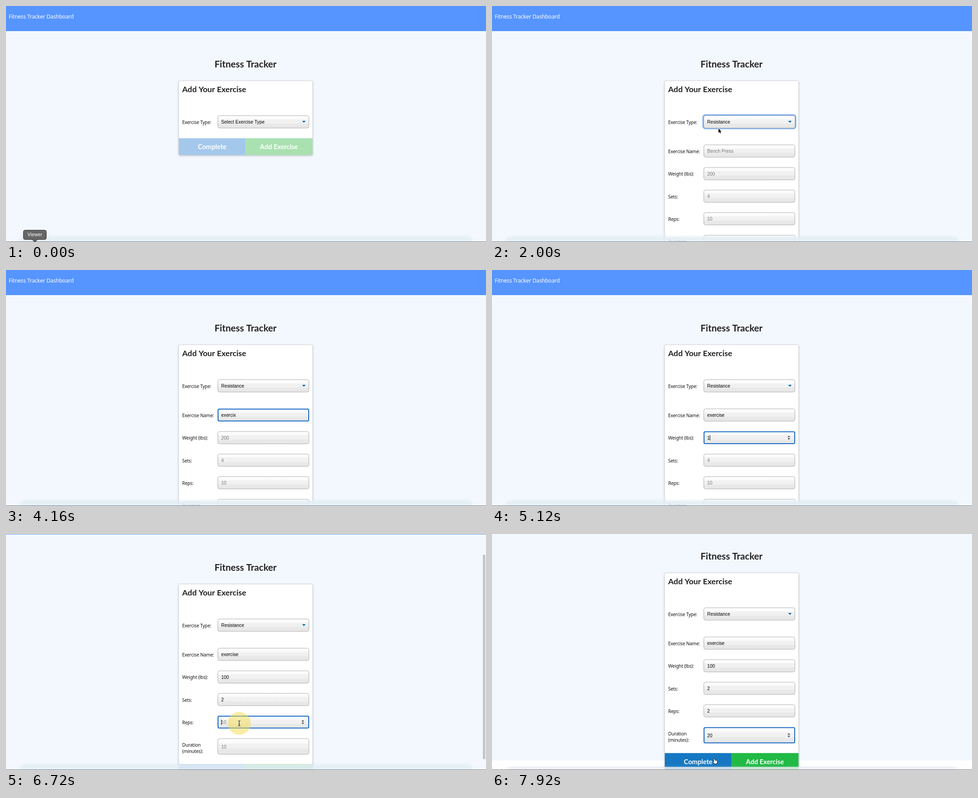
An HTML page with a canvas that plays this animation: 1064x526 px, repeating every 8 s.

```html
<!DOCTYPE html>
<html lang="en">
<head>
<meta charset="utf-8">
<title>Exercise form</title>
<style>
  html, body { margin: 0; height: 100%; overflow: hidden; background: #f3f8ff; }
  canvas { display: block; }
</style>
</head>
<body>
<canvas id="stage" width="1064" height="526"></canvas>
<script>
const ctx = document.getElementById('stage').getContext('2d');
const LOOP = 8000, STEP = 80;
const LABEL = '10.2px "Noto Sans", "Open Sans", sans-serif';
const INPUT = '10.3px "Liberation Sans", Arial, sans-serif';
const lato = size => `bold ${size}px Lato, sans-serif`;
const inter = (size, weight) => `${weight} ${size}px Inter, sans-serif`;

// Typed text: [time, value]; a field is focused from its own time to the next field's.
const fields = [
  { label: ['Exercise Name:'], y: 309.5, h: 27.5, hint: 'Bench Press', focus: 2400,
    typed: [[2800, 'e'], [2960, 'ex'], [3120, 'exe'], [3200, 'exer'], [3520, 'exerc'], [3680, 'exercix'],
            [3920, 'exercixs'], [4160, 'exercix'], [4240, 'exerci'], [4400, 'exercis'], [4480, 'exercise']] },
  { label: ['Weight (lbs):'], y: 360, h: 27.5, hint: '200', focus: 4880, number: true,
    typed: [[5120, '1'], [5440, '10'], [5520, '100']] },
  { label: ['Sets:'], y: 410.2, h: 27.5, hint: '4', focus: 5920, number: true, typed: [[6080, '2']] },
  { label: ['Reps:'], y: 460.5, h: 27.5, hint: '10', focus: 6640, number: true, typed: [[6960, '2']] },
  { label: ['Duration', '(minutes):'], y: 511, h: 35, hint: '10', focus: 7440, number: true,
    typed: [[7600, '2'], [7840, '20']] },
];
const suggestions = ['Lidi Tarvek', 'AttA', 'sasdD', 'ddadsadd', 'wefwf', 'LidiT'];

const pointerPath = [
  [80, 64, 530], [640, 514, 258], [1560, 514, 258], [1720, 502, 273], [2000, 502, 273], [2320, 499, 325],
  [4560, 499, 325], [4800, 505, 383], [5600, 505, 383], [5840, 510, 431], [6480, 510, 431], [6640, 517, 422],
  [7120, 517, 422], [7360, 515, 450], [7680, 515, 450], [7920, 491, 506],
];
const pointerShown = [[160, 2800], [4560, 5120], [5680, 6080], [6240, 6960], [7040, 7600], [7840, LOOP]];
const clicks = [[1120, 1560], [1720, 1840], [2400, 2560], [4800, 4960], [5840, 5920], [6560, 6640], [7360, 7440]];

const within = (t, a, b) => t >= a && t < b;

function ease(t, a, b) {
  const p = Math.min(1, Math.max(0, (t - a) / (b - a)));
  return p * p * (3 - 2 * p);
}

function text(str, x, y, font, color, align = 'left', spacing = '0px') {
  ctx.font = font;
  ctx.fillStyle = color;
  ctx.textAlign = align;
  ctx.letterSpacing = spacing;
  ctx.fillText(str, x, y);
}

function box(x, y, w, h, r, fill, stroke, width = 1) {
  ctx.beginPath();
  ctx.roundRect(x, y, w, h, r);
  if (fill) { ctx.fillStyle = fill; ctx.fill(); }
  if (stroke) { ctx.strokeStyle = stroke; ctx.lineWidth = width; ctx.stroke(); }
}

function polygon(points, fill, stroke) {
  ctx.beginPath();
  points.forEach(([x, y]) => ctx.lineTo(x, y));
  ctx.closePath();
  if (stroke) { ctx.strokeStyle = stroke; ctx.lineWidth = 1.4; ctx.stroke(); }
  ctx.fillStyle = fill;
  ctx.fill();
}

function withShadow(color, blur, offset, draw) {
  ctx.save();
  ctx.shadowColor = color;
  ctx.shadowBlur = blur;
  ctx.shadowOffsetY = offset;
  draw();
  ctx.restore();
}

function control(y, h, focused) {
  const g = ctx.createLinearGradient(0, y, 0, y + h);
  [[0, '#fff'], [0.3, '#f9f9f9'], [0.3, '#f2f2f2'], [0.64, '#f0f0f0'], [0.64, '#eaeaea'], [1, '#e6e6e6']]
    .forEach(([at, color]) => g.addColorStop(at, color));
  if (focused) box(470, y + 0.5, 201, h - 1, 2.5, g, '#1567c4', 2);
  else box(469.5, y, 202, h, 4, g, '#adadad');
}

function label(lines, y) {
  lines.forEach((line, i) => text(line, 390.5, y + i * 14.2, LABEL, '#111', 'left', '-0.16px'));
}

function drawField(t, field, i) {
  const end = i + 1 < fields.length ? fields[i + 1].focus : LOOP;
  const focused = within(t, field.focus, end);
  const entry = field.typed.filter(([at]) => at <= t).pop();
  const value = entry ? entry[1] : '';
  const mid = field.y + field.h / 2;
  label(field.label, field.label.length > 1 ? 529 : mid + 4.6);
  control(field.y, field.h, focused);
  text(value || field.hint, 477, mid + 4, INPUT, value ? '#000' : '#767676');
  if (!focused) return;
  if (!within(t, 4160, 4400) && t < 7840) {
    const caret = 477 + (value ? ctx.measureText(value).width : 0);
    ctx.fillStyle = '#000';
    ctx.fillRect(caret, mid - 5.5, 1, 11.5);
  }
  if (field.number) {
    polygon([[655, mid - 1.3], [658, mid - 4.5], [661, mid - 1.3]], '#444');
    polygon([[655, mid + 1.3], [658, mid + 4.5], [661, mid + 1.3]], '#444');
  }
}

function drawButtons(t, y) {
  const active = t >= 7840;
  const complete = active ? (t >= 7920 ? '#1678c2' : '#2185d0') : '#a4c8ec';
  box(383, y, 148.5, 37.5, [0, 0, 0, 3], complete);
  box(531.5, y, 148, 37.5, [0, 0, 3, 0], active ? '#21ba45' : '#a9e1b0');
  text('Complete', 457, y + 24.7, lato(14.7), '#fff', 'center');
  text('Add Exercise', 605, y + 24.7, lato(14.7), '#fff', 'center');
}

function drawMenu() {
  withShadow('rgba(0,0,0,.35)', 12, 5, () => box(460.5, 248, 204.5, 49.5, 4, '#7a7c7e'));
  ctx.beginPath();
  [[466, 258.5], [468, 261], [471.5, 255]].forEach(([x, y]) => ctx.lineTo(x, y));
  ctx.strokeStyle = '#c4c4c4';
  ctx.lineWidth = 1;
  ctx.stroke();
  text('Select Exercise Type', 476.5, 262, inter(9.8, 400), '#bbb');
  text('Resistance', 476.5, 276, inter(9.8, 500), '#fff');
  text('Cardio', 476.5, 290, inter(9.8, 500), '#fff');
}

function drawPage(t, scroll) {
  const expanded = t >= 2000;
  const footer = expanded ? 568.3 : 294.7;
  ctx.save();
  ctx.translate(0, -scroll);
  ctx.fillStyle = '#f3f8ff';
  ctx.fillRect(0, 0, 1064, 585);
  ctx.fillStyle = '#5694ff';
  ctx.fillRect(0, 0, 1064, 56);
  text('Fitness Tracker Dashboard', 6, 28, '12px "Noto Sans", "Open Sans", sans-serif', '#fff', 'left', '-0.2px');
  text('Fitness Tracker', 531, 136.8, lato(20.6), '#212121', 'center');

  withShadow('rgba(0,0,0,.3)', 4, 1, () => box(383, 167, 296.5, footer - 129.5, 3, '#fff'));
  box(382.7, 166.7, 297, footer - 129, 3, null, '#d4d6da', 0.8);
  text('Add Your Exercise', 390.5, 192.3, lato(17.7), '#212121');

  label(['Exercise Type:'], 262.8);
  if (within(t, 1120, 2400)) box(468, 243, 205, 30, 5, null, '#78abf0', 3);
  control(244.5, 27.5, false);
  text(expanded ? 'Resistance' : 'Select Exercise Type', 477, 262, INPUT, '#000');
  polygon([[656.3, 256], [664.3, 256], [660.3, 260.3]], '#0a6cb5');

  if (expanded) fields.forEach((field, i) => drawField(t, field, i));
  drawButtons(t, footer);
  if (within(t, 1200, 1920)) drawMenu();
  if (within(t, 2480, 2800)) {
    box(468.5, 338, 203.5, 172, 3, '#28292b');
    suggestions.forEach((name, i) => text(name, 477.5, 361 + i * 26.65, inter(9.6, 600), '#f2f2f2'));
  }
  ctx.restore();
}

function drawDesktopEdge(t, scroll) {
  const top = scroll > 70 ? 519 : 514;
  withShadow('rgba(190,210,225,.4)', 6, 0, () =>
    box(30, top, 1004, 30, 14, scroll > 70 ? 'rgba(238,239,241,.8)' : 'rgba(231,240,247,.75)'));
  if (scroll > 70) box(383, 507, 296.5, 18, 0, null);
  ctx.fillStyle = '#6d747d';
  ctx.fillRect(0, 525, 1064, 1);
  if (t < 240) {
    polygon([[58, 520], [70, 520], [64, 526]], '#646464', '#333');
    box(38.5, 499.5, 51, 21, 4, '#666', '#3a3a3a');
    polygon([[58.5, 519], [69.5, 519], [64, 525]], '#666');
    text('Viewer', 64, 513.3, '10.8px "Liberation Sans", Arial, sans-serif', '#fff', 'center');
  }
}

function pointerAt(t) {
  const next = pointerPath.findIndex(([at]) => at > t);
  if (next < 1) return pointerPath.at(next).slice(1);
  const [t0, x0, y0] = pointerPath[next - 1], [t1, x1, y1] = pointerPath[next];
  const p = ease(t, t0, t1);
  return [x0 + (x1 - x0) * p, y0 + (y1 - y0) * p];
}

function drawBeam() {
  for (const [color, width] of [['rgba(255,255,255,.7)', 2.4], ['#111', 1.1]]) {
    ctx.beginPath();
    for (const s of [-1, 1]) {
      ctx.moveTo(-2.7, s * 5.8);
      ctx.quadraticCurveTo(0, s * 5.8, 0, s * 4);
      ctx.quadraticCurveTo(0, s * 5.8, 2.7, s * 5.8);
    }
    ctx.moveTo(0, -4.5);
    ctx.lineTo(0, 4.5);
    ctx.moveTo(-1.5, 1.5);
    ctx.lineTo(1.5, 1.5);
    ctx.strokeStyle = color;
    ctx.lineWidth = width;
    ctx.stroke();
  }
}

function drawHand() {
  polygon([[0.5, -5], [2, -5], [3, -1.5], [6.5, -1], [8, 0.5], [7.5, 4], [6.5, 6], [2.5, 6],
           [-0.5, 2.5], [-0.8, 1], [1.5, 1.5]], '#fff', '#111');
}

function drawPointer(t) {
  if (!pointerShown.some(([a, b]) => within(t, a, b))) return;
  ctx.save();
  ctx.translate(...pointerAt(t));
  const click = clicks.find(([a, b]) => within(t, a, b + 160));
  if (click) {
    const fade = Math.max(0, (t - click[1]) / 160);
    ctx.beginPath();
    ctx.arc(0, 0, 22 + fade * 7, 0, Math.PI * 2);
    ctx.fillStyle = `rgba(243,219,72,${0.78 * (1 - fade * 0.75)})`;
    ctx.fill();
  }
  if (t >= 7920) drawHand();
  else if (within(t, 2240, 7840)) drawBeam();
  else polygon([[0, 0], [0, 9.6], [2.2, 7.6], [3.8, 11], [5.3, 10.3], [3.8, 7], [6.7, 7]], '#000', '#fff');
  ctx.restore();
}

function render(now) {
  const t = Math.floor((now % LOOP) / STEP) * STEP;
  const scroll = 55 * ease(t, 6160, 6560) + 25 * ease(t, 6960, 7360);
  ctx.fillStyle = '#fff';
  ctx.fillRect(0, 0, 1064, 526);
  drawPage(t, scroll);
  if (within(t, 6240, 7600)) box(1057, 2 + scroll * 0.8, 5.5, 456, 3, '#c2c5ca');
  drawDesktopEdge(t, scroll);
  drawPointer(t);
}

const start = performance.now();
function tick() {
  render(performance.now() - start);
  requestAnimationFrame(tick);
}
tick();
</script>
</body>
</html>
```
